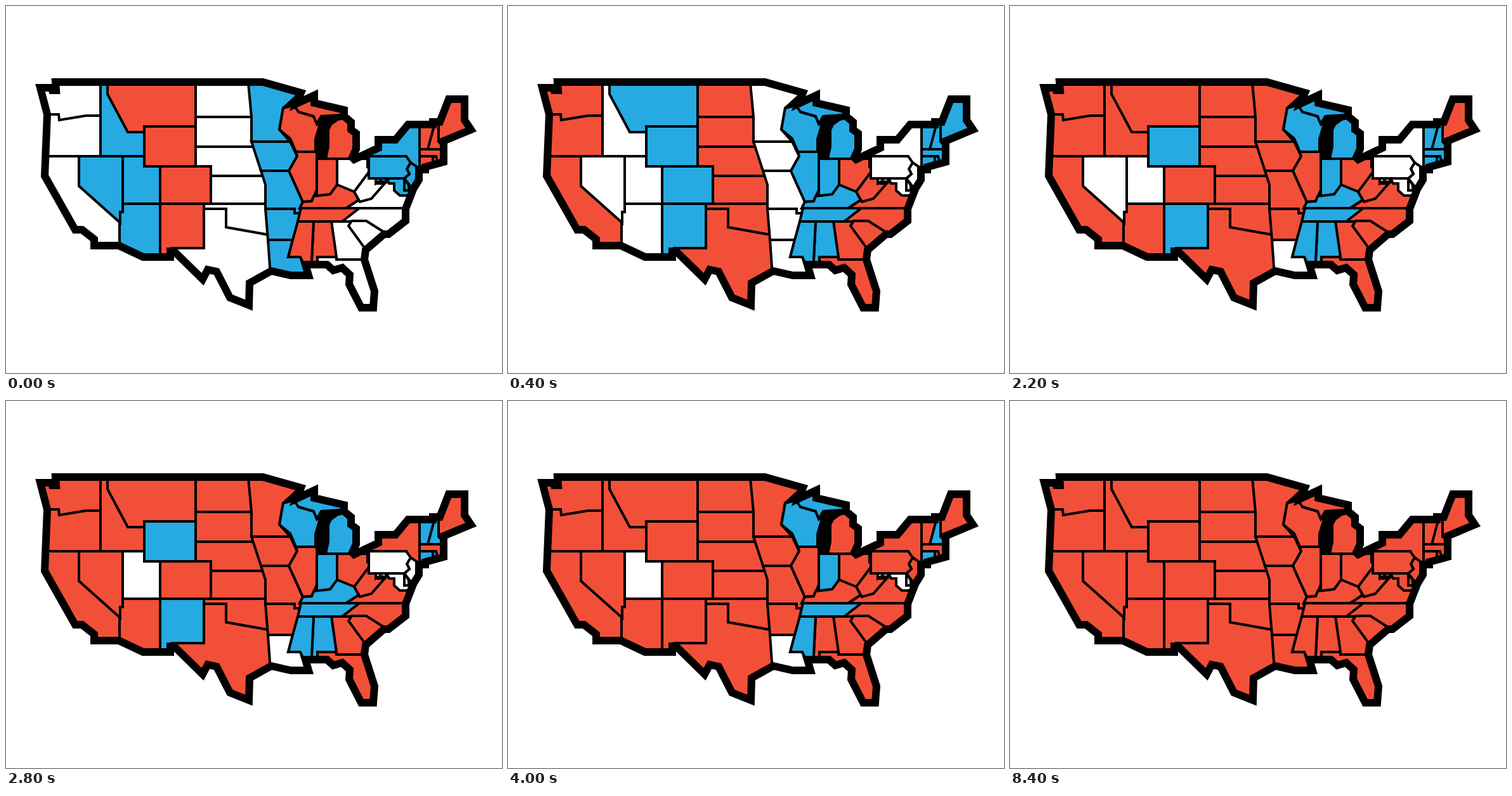
An HTML page for the animation above (8.6 s loop, 782 px wide and 579 px high).

```html
<!DOCTYPE html>
<html lang="en">
<head>
<meta charset="utf-8">
<title>Map turning red</title>
<style>
  html, body { margin: 0; width: 100%; height: 100%; overflow: hidden; background: #fff; }
  svg { display: block; }
</style>
</head>
<body>
<svg width="782" height="579" viewBox="0 0 782 579" stroke="#000" stroke-miterlimit="6">
  <clipPath id="land"><path class="coast"/></clipPath>
  <path class="coast"/>
  <g id="states" clip-path="url(#land)" stroke-width="4"></g>
  <path class="coast" fill="none" stroke-width="12"/>
</svg>
<script>
const LOOP = 8600, STEP = 200;
const CYCLE = ['#fff', '#27a9e1', '#f24f38'];
const RED = 2;

// States that start blue or red; all others start white
const STARTS = [
  [1, 'ID NV UT AZ MN IA MO AR LA NY PA NJ MD DE PAN'],
  [2, 'MT WY CO NM WI UP MI IL IN KY TN MS AL VT NH ME MA CT RI']
];
// One group turns red for good at each step, once the cycling stops
const FIRST_WAVE = 3;
const WAVES = ('MT,CO,ID,IA,IL,ME,MN,AZ,MO AR,NY,NV,MA,AL,MI,WY,KY VT,NM PA,' +
  'NJ RI,WI UP,UT IN,TN LA NH,MS CT MD').split(',');
const LAST_STEP = 42;

const layer = document.getElementById('states');
const states = [];
const has = (list, id) => list.split(' ').includes(id);

function poly(id, points) {
  const el = document.createElementNS('http://www.w3.org/2000/svg', 'polygon');
  el.setAttribute('points', points);
  layer.appendChild(el);
  const start = STARTS.find(s => has(s[1], id));
  const wave = WAVES.findIndex(w => has(w, id));
  const lock = wave >= 0 ? wave + FIRST_WAVE : start ? LAST_STEP : 2;
  states.push({ el, first: start ? start[0] : 0, lock });
}

const box = (id, l, t, r, b) => poly(id, `${l},${t} ${r},${t} ${r},${b} ${l},${b}`);

// Later shapes cover earlier ones, and the coast trims the rest.
// West
box('CA', 40, 237, 184, 400);
box('AZ', 179, 312, 243, 400);
poly('NV', '115,237 184,237 184,325 180,325 180,342 115,284');
box('OR', 40, 171, 149, 237);
poly('WA', '40,100 149,100 149,173 126,173 84,180 83,171 40,171');
box('ID', 149, 100, 218, 237);
poly('MT', '160,100 299,100 299,199 192,199 160,139');
box('UT', 184, 237, 243, 312);
box('WY', 218, 190, 299, 253);

// Plains
box('ND', 299, 100, 400, 175);
box('SD', 299, 175, 400, 222);
box('NE', 299, 222, 420, 268);
box('KS', 323, 268, 420, 312);
box('CO', 243, 253, 323, 312);
box('NM', 243, 312, 312, 400);
poly('TX', '312,320 430,320 430,490 262,490 262,382 312,382');
poly('OK', '312,312 420,312 420,362 347,349 347,320 312,320');
poly('LA', '413,369 452,369 445,396 464,396 480,440 418,440');
poly('AR', '409,320 470,320 452,369 413,369');
poly('MO', '402,260 446,260 468,309 463,327 455,327 455,320 409,320 409,282');
poly('MN', '380,100 480,100 480,122 437,161 431,195 448,214 387,214 387,175');
poly('IA', '387,214 448,214 459,237 446,260 402,260');

// Lakes
poly('WI', '437,161 457,156 461,167 485,174 490,186 495,186 488,210 488,230 457,230 448,209 431,195');
poly('UP', '461,167 455,158 487,140 540,160 540,171 497,174 490,186 485,174');
poly('IL', '457,230 490,230 490,290 482,308 468,309 446,260 459,237');
box('IN', 490, 241, 522, 300);
box('OH', 522, 241, 572, 293);
poly('MI', '512,187 523,179 560,170 560,241 504,241 508,222 508,195');

// South
poly('VA', '536,319 612,270 660,270 660,319');
poly('KY', '468,309 482,308 485,300 511,297 522,282 549,293 556,306 536,319 463,319');
poly('WV', '549,293 572,262 572,272 583,272 583,280 597,280 576,304 558,309');
box('NC', 530, 319, 650, 370);
box('FL', 491, 396, 600, 490);
poly('GA', '513,340 545,340 600,390 600,400 521,400');
poly('SC', '545,339 568,339 612,367 575,395 540,347');
poly('AL', '485,340 513,340 521,396 491,396 491,420 481,420');
poly('MS', '460,340 485,340 481,420 475,420 464,396 445,396 452,369');
poly('TN', '465,319 557,319 530,340 460,340');

// Northeast
box('NY', 570, 170, 652, 254);
poly('MD', '600,272 628,272 628,291 640,291 633,299 621,299 612,291 612,280 604,280');
poly('PAN', '583,272 602,272 597,278 590,276 583,280');
poly('DE', '628,272 635,283 635,291 628,291');
poly('NJ', '638,247 660,262 660,290 642,290 628,272 636,265 632,257');
poly('PA', '572,237 631,237 638,247 632,257 636,265 628,272 572,272');
box('NH', 665, 170, 687, 226);
poly('VT', '652,170 680,170 665,226 652,226');
poly('ME', '682,130 760,130 760,219 687,219 682,214');
box('MA', 652, 226, 700, 260);
box('CT', 652, 237, 673, 262);
poly('RI', '673,237 678,237 684,260 673,260');

const north = 'M54 129 72 129 73 133 79 133 78 120 405 120 465 137 458 154 486 141 486 153 533 164 533 174 ' +
  '544 183 544 195 552 201 552 226 546 239 549 242 587 224';
const east = ' 587 211 614 211 634 187 673 187 673 183 684 183 698 147 723 147 723 180 733 195 690 213 690 246 ' +
  '661 254 661 258 651 258 651 274 642 289 630 320 630 339 603 360 596 360 567 385 565 400';
const south = ' 581 450 579 476 560 476 541 439 542 424 530 413 516 417 506 408 472 408 477 425 449 425 418 418 ' +
  '384 437 383 472 353 460 332 419 318 416 310 431 265 387 259 387 259 396';
const west = ' 216 396 178 378 139 378 139 368 120 353 109 353 61 268 65 171Z';
for (const p of document.querySelectorAll('.coast')) p.setAttribute('d', north + east + south + west);

function draw(t) {
  const step = Math.floor(t / STEP);
  for (const s of states) {
    const tone = step >= s.lock ? RED : (s.first + Math.min(2, step)) % 3;
    s.el.setAttribute('fill', CYCLE[tone]);
  }
}

const start = performance.now();
function tick(now) {
  draw(Math.max(0, now - start) % LOOP);
  requestAnimationFrame(tick);
}
draw(0);
requestAnimationFrame(tick);
</script>
</body>
</html>
```
